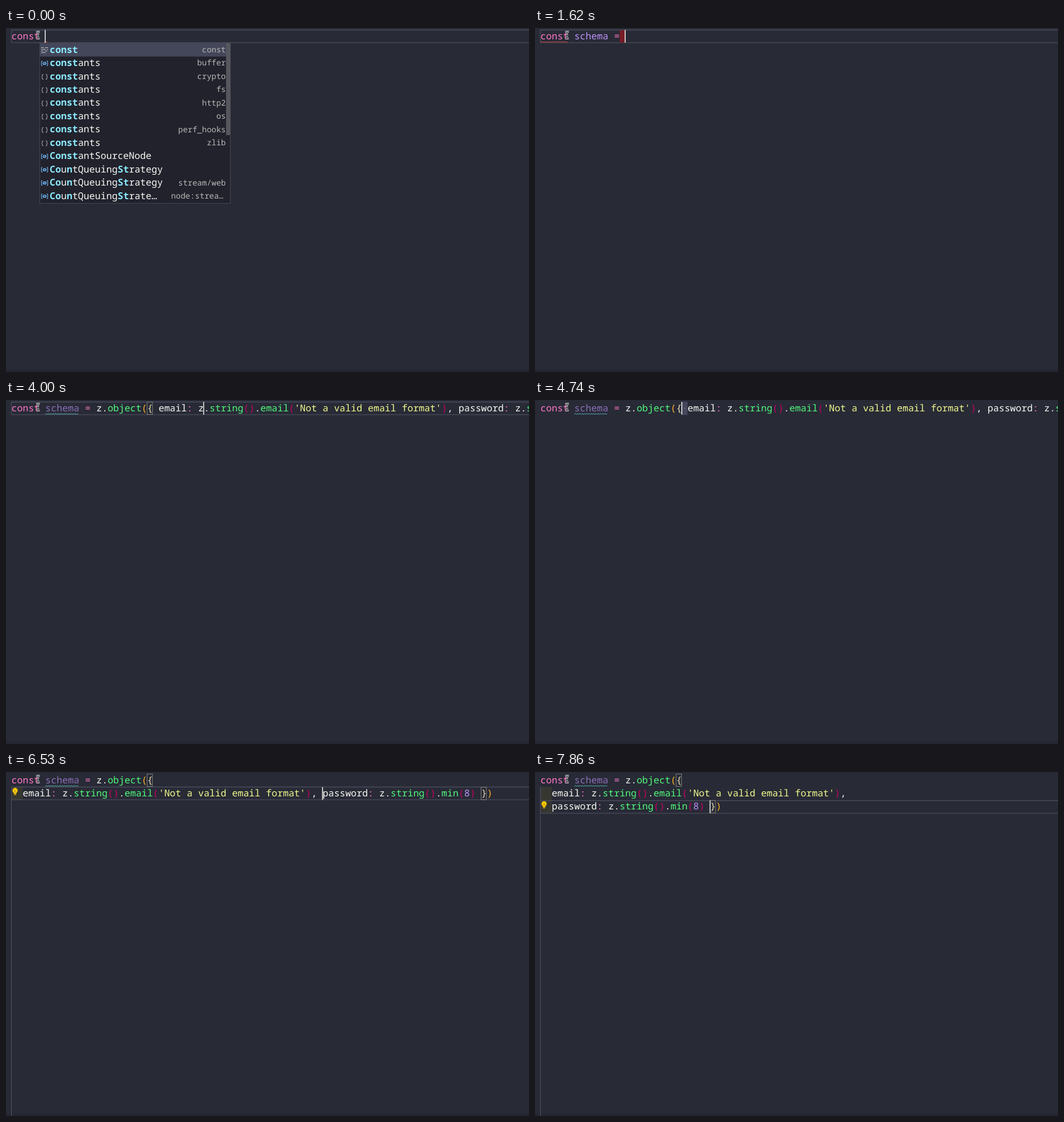
Recreate the animation shown at these times as an HTML page. Size 922 by 607 pixels, loop 8 s.

```html
<!DOCTYPE html>
<html lang="en">
<head>
<meta charset="utf-8">
<title>Editor</title>
<style>
  html, body { margin: 0; width: 100%; height: 100%; overflow: hidden; background: #282a36; }
  svg { display: block; width: 922px; height: 607px; }
  text { font: 500 16.63px "Noto Sans Mono", monospace; white-space: pre; text-rendering: geometricPrecision; }
  .b { font-weight: 700; }
  .side { font-size: 14px; font-weight: 400; }
  .icon { font-size: 10px; font-weight: 400; }
</style>
</head>
<body>
<svg id="stage" viewBox="0 0 922 607"></svg>
<script>
const LOOP = 8000, LEFT = 9.5, TOP = 3, CW = 9.978, LH = 23.4;
const C = {
  fg: '#f8f8f2', pink: '#ff79c6', purple: '#bd93f9', green: '#50fa7b',
  yellow: '#f1fa8c', cyan: '#8be9fd', faded: '#8b70b8', line: '#44475a'
};
const BRACKETS = ['#fdb528', '#e8dfba', '#cb0066'];

const px = col => LEFT + col * CW;
const py = row => TOP + row * LH;
const rect = (x, y, w, h, fill, more = '') =>
  `<rect x="${x}" y="${y}" width="${w}" height="${h}" fill="${fill}" ${more}/>`;
const text = (x, y, s, fill, more = '') =>
  `<text x="${x}" y="${y}" fill="${fill}" ${more}>${s}</text>`;
const path = (d, stroke, w = 1) =>
  `<path d="${d}" fill="none" stroke="${stroke}" stroke-width="${w}"/>`;

const HEAD = 'const schema = z.object({';
const EMAIL = "email: z.string().email('Not a valid email format'),";
const PASS = 'password: z.string().min(8) })';
const ONE = `${HEAD} ${EMAIL} ${PASS}`;
const TWO = `${HEAD}\n  ${EMAIL} ${PASS}`;
const THREE = `${HEAD}\n  ${EMAIL}\n  ${PASS}`;

// Each entry changes part of the state at its time; cur, boxes and sel are [row, col].
const KEYS = [
  [0, { code: 'const ', cur: [0, 6], row: 0, boxes: [], list: 'const', err: [5.8, 6.6] }],
  [150, { code: 'const s', cur: [0, 7], list: null, err: null }],
  [300, { code: 'const sc', cur: [0, 8] }],
  [450, { code: 'const sch', cur: [0, 9], list: 'sch' }],
  [600, { code: 'const sche', cur: [0, 10], list: null }],
  [740, { code: 'const schem', cur: [0, 11] }],
  [890, { code: 'const schema', cur: [0, 12] }],
  [1040, { code: 'const schema ', cur: [0, 13], trail: 12 }],
  [1330, { code: 'const schema =', cur: [0, 14], trail: 0, err: [0, 5] }],
  [1480, { code: 'const schema = ', cur: [0, 15] }],
  [1620, { trail: 14 }],
  [1770, { code: ONE, cur: [0, 109], trail: 0, scroll: 215 }],
  [1920, { err: null }],
  [2070, { cur: null, scroll: 0 }],
  [2370, { cur: [0, 14], unused: true }],
  [2520, { cur: [0, 16] }],
  [2810, { cur: null, boxes: [[0, 23]] }],
  [3410, { cur: [0, 25], boxes: [[0, 24]] }],
  [3710, { cur: [0, 34] }],
  [3850, { cur: [0, 79] }],
  [4000, { cur: [0, 34] }],
  [4150, { cur: [0, 26] }],
  [4440, { cur: [0, 25], sel: [0, 25], row: -1, boxes: [[0, 24]] }],
  [4590, { boxes: [] }],
  [4890, { code: TWO, cur: [1, 2], sel: null, row: 1, guide: true }],
  [5040, { boxes: [[0, 24], [1, 83]] }],
  [5190, { bulb: 1 }],
  [5340, { cur: [1, 7] }],
  [5640, { cur: [1, 17] }],
  [5790, { cur: [1, 25] }],
  [5930, { cur: [1, 54] }],
  [6080, { cur: [1, 66] }],
  [6380, { cur: [1, 63] }],
  [6530, { cur: [1, 55] }],
  [6830, { cur: [1, 54], sel: [1, 54], row: -1, boxes: [[0, 24]] }],
  [6980, { boxes: [] }],
  [7120, { code: THREE, cur: [2, 2], sel: null, row: 2, bulb: 0 }],
  [7270, { boxes: [[0, 24], [2, 30]] }],
  [7420, { cur: [2, 10], bulb: 2 }],
  [7570, { cur: [2, 13] }],
  [7710, { cur: [2, 20] }],
  [7860, { cur: [2, 30] }]
];
const STATES = [];
KEYS.forEach(([at, patch], i) => STATES.push({ ...STATES[i - 1], ...patch, at }));

// An asterisk pair marks the matched letters.
const LISTS = {
  const: [
    ['key', '*const*', 'const'], ['var', '*const*ants', 'buffer'],
    ...['crypto', 'fs', 'http2', 'os', 'perf_hooks', 'zlib'].map(m => ['mod', '*const*ants', m]),
    ['var', '*Const*antSourceNode', ''], ['var', '*Co*u*n*tQueuing*St*rategy', ''],
    ['var', '*Co*u*n*tQueuing*St*rategy', 'stream/web'],
    ['var', '*Co*u*n*tQueuing*St*rate…', 'node:strea…']
  ],
  sch: [['var', '*sch*eduler', 'timers/promises']]
};

function tokenColor(tok, col, next, unused) {
  if (tok === 'const' || tok === '=' || tok === ':') return C.pink;
  if (tok[0] === "'") return C.yellow;
  if (/^\d/.test(tok)) return C.purple;
  if (/^\w/.test(tok) && next === '(') return C.green;
  if (col === 6) return unused ? C.faded : C.purple;
  return C.fg;
}

function drawCode(s) {
  let out = '', depth = 0;
  s.code.split('\n').forEach((line, row) => {
    for (const m of line.matchAll(/'[^']*'|\w+|[^\w\s]/g)) {
      const tok = m[0], col = m.index;
      let fill;
      if ('({'.includes(tok)) fill = BRACKETS[depth++ % 3];
      else if (')}'.includes(tok)) fill = BRACKETS[--depth % 3];
      else fill = tokenColor(tok, row ? -1 : col, line[col + tok.length], s.unused);
      out += text(px(col), py(row) + 16.6, tok, fill);
    }
  });
  return out;
}

function squiggle(from, to, color) {
  let d = '';
  for (let x = px(from), i = 0; x <= px(to); x += 2, i++)
    d += `${i ? 'L' : 'M'}${x} ${i % 2 ? 23.6 : 25.6}`;
  return path(d, color);
}

function icon(kind, y) {
  if (kind === 'key')
    return path(`M62 ${y - 4.5}h5m2 0h5M62 ${y - 1.5}h8m2 0h2M62 ${y + 1.5}h4m2 0h5M62 ${y + 4.5}h8`, '#c5c5c5', 1.1);
  if (kind === 'mod')
    return path(`M66 ${y - 4}h-1q-1 0-1 1v2l-1 1.3 1 1.3v2q0 1 1 1h1M70 ${y - 4}h1q1 0 1 1v2l1 1.3-1 1.3v2q0 1-1 1h-1`, '#c5c5c5');
  return path(`M64.5 ${y - 4}h-2v8h2M71.5 ${y - 4}h2v8h-2`, '#75beff') +
    `<ellipse cx="68" cy="${y}" rx="2.8" ry="2" fill="none" stroke="#75beff" stroke-width="1.3"/>` +
    path(`M66 ${y + 1.5}l4-3`, '#75beff');
}

function drawList(name, shift) {
  const rows = LISTS[name], h = rows.length * 23.45 + 1.5;
  let out = rect(59.5, 26.5, 336, h, '#21222c', 'stroke="#454754"') + rect(60, 27, 328, 23.4, C.line);
  rows.forEach(([kind, label, side], i) => {
    const y = 27 + i * 23.45;
    let x = 77;
    out += icon(kind, y + 12);
    label.split('*').forEach((part, j) => {
      if (part) out += text(x, y + 16.6, part, j % 2 ? C.cyan : C.fg, j % 2 ? 'class="b"' : '');
      x += part.length * CW;
    });
    const end = side.endsWith('…') ? 383.5 : 387.5;
    out += text(end, y + 16, side, '#b9b9b7', 'class="side" text-anchor="end"');
  });
  if (rows.length > 1) out += rect(388, 27, 7.5, 162, '#56575e');
  return `<g transform="translate(${shift} 0)">${out}</g>`;
}

function drawBulb(row) {
  const y = py(row) + 6.3;
  return `<circle cx="16" cy="${y}" r="4.6" fill="#ffcc00"/>` +
    rect(13.7, y + 3, 4.6, 3, '#ffcc00') + rect(14, y + 6.6, 4, 1.4, '#d8ae12') +
    path(`M14 ${y - 1}l2 2 2-2M16 ${y + 1}v3`, '#8b741c', 0.8);
}

function drawMouse() {
  const d = 'M53.5 6.5q3 0 3 2v8q0 2-3 2M59.5 6.5q-3 0-3 2v8q0 2 3 2M55 13.5h3';
  return path(d, '#f4f4f4', 2.8) + path(d, '#181920', 1.1);
}

function draw(s) {
  const lines = s.code.split('\n').length;
  let out = rect(0, 0, 922, 607, '#282a36') + rect(0, 603, 922, 4, '#242530');
  if (s.guide) {
    out += rect(10, py(1), 19.5, LH * (lines - 1), '#373732');
    out += path('M9.5 26.5V607', '#50525f');
  }
  if (s.row >= 0) {
    const y = Math.round(py(s.row)) + 0.5;
    out += path(`M922 ${y}H9.5v22.4H922`, '#4a4c5c', 1.3);
  }
  if (s.trail) out += rect(px(s.trail), 4, CW, 21.5, '#761c27');
  if (s.sel) {
    const x = px(s.sel[1]), y = py(s.sel[0]);
    out += rect(x, y, CW, LH, C.line) + `<circle cx="${x + 5}" cy="${y + 11.5}" r="1.1" fill="#777987"/>`;
  }
  for (const [row, col] of s.boxes)
    out += rect(px(col) - 0.2, py(row) + 0.5, CW - 0.6, LH - 1.4, 'none', 'stroke="#858477"');

  let body = drawCode(s);
  if (s.err) body += squiggle(...s.err, '#ef4b4b');
  if (s.unused) body += squiggle(6, 12, '#62c4cc');
  if (s.cur) body += rect(px(s.cur[1]) - 1, py(s.cur[0]) + 0.3, 1.5, LH - 0.8, C.fg);
  out += '<clipPath id="view"><rect x="9" width="913" height="607"/></clipPath>' +
    `<g clip-path="url(#view)"><g transform="translate(${-(s.scroll || 0)} 0)">${body}</g></g>`;

  if (s.bulb) out += drawBulb(s.bulb);
  if (s.list) out += drawList(s.list, s.list === 'sch' ? 4 * CW : 0);
  return out + drawMouse();
}

const stage = document.getElementById('stage');
let shown = null;
function tick() {
  const t = performance.now() % LOOP;
  const s = STATES.findLast(k => k.at <= t);
  if (s !== shown) stage.innerHTML = draw(shown = s);
  requestAnimationFrame(tick);
}
tick();
</script>
</body>
</html>
```
